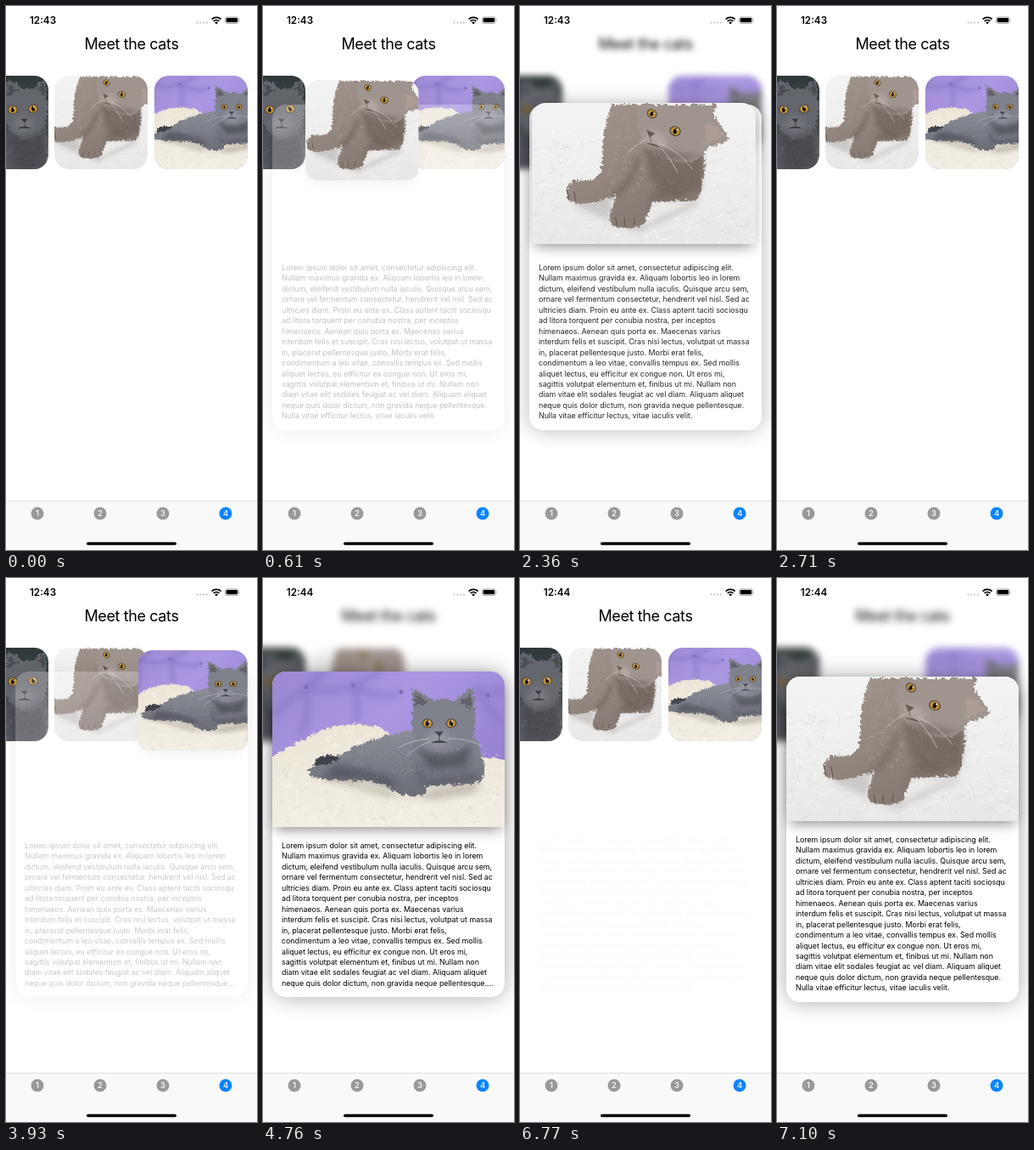
Write an HTML page that moves like this. It is 296 px wide and 640 px high and loops after 8 s.

```html
<!DOCTYPE html>
<html lang="en">
<head>
<meta charset="utf-8">
<title>Meet the cats</title>
<style>
html, body { margin: 0; width: 100%; height: 100%; overflow: hidden; background: #fff; }
body { position: relative; font-family: Inter, "Noto Sans", sans-serif; color: #000; }
body > *, .thumb { position: absolute; }
#grid { inset: 0; }
h1 { position: absolute; left: 0; top: 34px; width: 296px; margin: 0; text-align: center;
  font-size: 18px; line-height: 22px; font-weight: 400; letter-spacing: -.38px; }
.thumb { top: 82px; width: 110px; height: 110px; border-radius: 17px; overflow: hidden; }
#card { left: 11px; width: 274px; height: 383px; border-radius: 16px; background: #fff;
  box-shadow: 0 0 26px #0005; }
#text { position: absolute; left: 11px; margin: 0; white-space: pre; font-size: 8.9px;
  line-height: 12.46px; letter-spacing: -.03px; }
#hero { overflow: hidden; }
#chrome { left: 0; top: 0; }
.fur { fill: none; opacity: .45; }
.shade { filter: blur(4px); }
</style>
</head>
<body>
<svg width="0" height="0">
  <defs>
    <linearGradient id="dusk" x2="0" y2="1">
      <stop stop-color="#2f3838"/><stop offset=".6" stop-color="#4a5150"/><stop offset="1" stop-color="#8c8580"/>
    </linearGradient>
    <linearGradient id="snow" x2="0" y2="1">
      <stop stop-color="#f3f3f3"/><stop offset=".5" stop-color="#efeeee"/><stop offset="1" stop-color="#e9e8e7"/>
    </linearGradient>
    <linearGradient id="sofa" x2="1" y2=".6">
      <stop stop-color="#9c88d2"/><stop offset=".5" stop-color="#ab97e2"/><stop offset="1" stop-color="#9480cf"/>
    </linearGradient>
    <linearGradient id="cream" x2="0" y2="1">
      <stop stop-color="#ece5d6"/><stop offset="1" stop-color="#f3efe6"/>
    </linearGradient>
    <linearGradient id="taupe" x2=".6" y2="1">
      <stop stop-color="#a3978f"/><stop offset="1" stop-color="#857870"/>
    </linearGradient>
    <linearGradient id="slate" x2="0" y2="1">
      <stop stop-color="#8b8d97"/><stop offset="1" stop-color="#6a6c76"/>
    </linearGradient>
    <filter id="fuzz" color-interpolation-filters="sRGB">
      <feTurbulence baseFrequency=".16" numOctaves="2" seed="3"/>
      <feDisplacementMap in="SourceGraphic" scale="8" xChannelSelector="R" yChannelSelector="G"/>
      <feGaussianBlur stdDeviation=".4"/>
    </filter>
    <g id="eye">
      <ellipse rx="6.4" ry="5.4" fill="#4b4540"/><ellipse rx="5.2" ry="4.5" fill="#c08f35"/>
      <ellipse rx="2" ry="3.2" fill="#17130f"/><circle cx="1.4" cy="-2" r=".9" fill="#fff"/>
    </g>
  </defs>

  <symbol id="cat1" viewBox="0 0 110 110" preserveAspectRatio="xMidYMid slice">
    <rect width="110" height="110" fill="url(#dusk)"/>
    <g filter="url(#fuzz)">
      <path d="M42 110C50 90 54 78 62 66L104 58C107 76 106 94 106 110Z" fill="#55575d"/>
      <path d="M55 28L61 2 78 13 92 12 103 0 107 32C109 56 100 72 83 73 64 72 52 52 55 28Z" fill="#64666d"/>
      <path d="M60 22L63 8 73 15ZM96 14L102 5 104 22Z" fill="#4a4c52"/>
      <path class="fur" data-area="58 62 46 48 70 8" stroke="#7d7f87"/>
    </g>
    <path class="shade" d="M62 68Q84 78 104 64V110H70Z" fill="#3a3c42" opacity=".5"/>
    <ellipse cx="81" cy="57" rx="12" ry="9" fill="#777981" class="shade"/>
    <path d="M78 51h7l-3 4ZM82 55v5M74 62Q82 58 89 62" fill="#3b3c41" stroke="#3b3c41" stroke-width=".8"/>
    <use href="#eye" transform="translate(68 40) rotate(12) scale(.95)"/>
    <use href="#eye" transform="translate(92 39) rotate(-10) scale(.95)"/>
  </symbol>

  <symbol id="cat2" viewBox="0 0 274 170" preserveAspectRatio="xMidYMid slice">
    <rect width="274" height="170" fill="url(#snow)"/>
    <path class="fur" data-area="0 40 274 130 130 16" stroke="#d3d1d0"/>
    <path class="fur" data-area="0 30 274 140 200 16" stroke="#fff"/>
    <path class="shade" d="M50 118L100 108 95 146 140 146 206 114 200 124 130 156 60 126Z" fill="#a9a5a2" opacity=".5"/>
    <g filter="url(#fuzz)">
      <path d="M96 0C88 20 86 40 86 56 86 74 84 84 76 90L54 91C39 94 39 114 50 118 70 121 86 114 101 110L95 130C90 142 96 149 110 148 126 150 140 146 139 134L146 117 196 115C206 110 210 84 208 50L222 0Z" fill="url(#taupe)"/>
      <path class="fur" data-area="92 5 95 100 120 9" stroke="#b8ada7"/>
    </g>
    <g class="shade" fill="#5d514c">
      <path d="M136 50C156 70 184 78 208 62L206 104 180 112 146 96Z" opacity=".45"/>
      <path d="M98 108Q122 92 128 62L134 66Q126 98 104 114Z" opacity=".45"/>
      <path d="M139 134Q142 108 160 96L190 114 146 117Z" opacity=".4"/>
    </g>
    <path d="M44 104l3 12M53 106l2 12M103 138l2 10M114 138v10M126 138l-1 9" stroke="#65594f" stroke-width="1.2"/>
    <g filter="url(#fuzz)">
      <path d="M128 0C126 20 128 44 140 52 152 66 180 74 200 66 207 62 210 58 212 52Q232 48 238 39 228 26 220 12L216 0Z" fill="#a0948f"/>
      <path d="M207 23Q225 22 233 38 220 43 208 48 212 36 207 23Z" fill="#ad9c96"/>
    </g>
    <path class="shade" d="M140 52C152 68 186 76 206 62 190 64 164 60 150 48Z" fill="#5f534e" opacity=".6"/>
    <ellipse class="shade" cx="152" cy="44" rx="14" ry="9" transform="rotate(28 152 44)" fill="#b3a8a2"/>
    <path d="M141 33l9 4-6 4ZM145 41l1 6M141 49Q150 48 160 55" fill="#6a5952" stroke="#6a5952" stroke-width=".9"/>
    <path d="M156 48Q180 58 196 80M154 50Q168 64 178 84M140 44Q128 50 118 60" fill="none" stroke="#e6e0dc" stroke-width=".6"/>
    <use href="#eye" transform="translate(147 13) rotate(40)"/>
    <use href="#eye" transform="translate(175 34) rotate(20) scale(1.1)"/>
  </symbol>

  <symbol id="cat3" viewBox="0 0 274 183" preserveAspectRatio="xMidYMid slice">
    <rect width="274" height="183" fill="url(#sofa)"/>
    <path class="shade" d="M0 50Q22 34 40 18T62 0M40 18Q70 28 95 16T128 0M40 18Q44 50 34 75M95 16Q104 40 98 62M95 16Q130 36 152 24M236 20Q256 30 274 20M240 18Q256 50 274 62" fill="none" stroke="#7562b2" stroke-width="5" opacity=".5"/>
    <g fill="#7f6cba"><circle cx="40" cy="18" r="2.5"/><circle cx="95" cy="16" r="2.5"/><circle cx="152" cy="24" r="2.5"/><circle cx="254" cy="28" r="2.5"/></g>
    <g filter="url(#fuzz)">
      <path d="M-8 98C18 92 40 70 70 63 96 57 125 58 145 76L240 98 282 102V192H-8Z" fill="url(#cream)"/>
      <path class="fur" data-area="0 100 274 83 130 12" stroke="#d8cfbd"/>
      <path class="fur" data-area="4 92 270 90 190 12" stroke="#fffdf6"/>
      <path class="fur" data-area="62 64 70 28 50 9" stroke="#fffdf6"/>
    </g>
    <path class="shade" d="M45 120Q100 130 142 142 170 152 186 140L246 132 240 142 190 150 130 146Z" fill="#8f8678" opacity=".5"/>
    <g filter="url(#fuzz)">
      <path d="M166 68C140 70 104 78 80 96 60 98 44 106 42 118 46 127 80 126 110 127 130 130 140 136 148 142 164 147 184 145 178 134 200 130 224 133 242 128 252 118 248 92 236 76Z" fill="url(#slate)"/>
      <path d="M48 104Q54 94 78 97 70 108 50 108Z" fill="#3f4149"/>
      <path class="fur" data-area="95 86 138 36 110 8" stroke="#9b9da7"/>
    </g>
    <g class="shade" fill="#41434c">
      <path d="M166 84Q200 110 236 84L230 112 186 116Z" opacity=".6"/>
      <path d="M72 110Q110 112 146 128L140 136 110 127 60 126Z" opacity=".55"/>
      <path d="M178 134Q168 118 170 100L180 128 240 120 242 128Z" opacity=".5"/>
    </g>
    <g filter="url(#fuzz)">
      <path d="M163 60L164 18Q178 24 187 33 200 29 213 33 223 22 236 17L237 58C238 80 222 92 200 93 178 92 162 80 163 60Z" fill="#7f818b"/>
      <path d="M167 40V24L181 34ZM219 34L233 23 232 42Z" fill="#62606a"/>
    </g>
    <ellipse class="shade" cx="196" cy="79" rx="14" ry="10" fill="#9496a0"/>
    <path d="M192 71h9l-4 5ZM197 76v5M188 84Q197 79 206 84" fill="#44464e" stroke="#44464e"/>
    <path d="M186 79Q165 80 148 90M187 82Q170 88 158 100M207 79Q230 78 248 88" fill="none" stroke="#d5d6dc" stroke-width=".6"/>
    <use href="#eye" transform="translate(183 61) rotate(10)"/>
    <use href="#eye" transform="translate(211 61) rotate(-10)"/>
  </symbol>
</svg>

<div id="grid">
  <h1>Meet the cats</h1>
  <svg class="thumb" style="left:-60px"><use href="#cat1" width="100%" height="100%"/></svg>
  <svg class="thumb" style="left:57px"><use href="#cat2" width="100%" height="100%"/></svg>
  <svg class="thumb" style="left:174.5px"><use href="#cat3" width="100%" height="100%"/></svg>
</div>
<div id="card"><p id="text"></p></div>
<svg id="hero"><use width="100%" height="100%"/></svg>

<svg id="chrome" width="296" height="640" text-anchor="middle">
  <text id="clock" x="43.5" y="21" font-size="11.7" font-weight="600">12:43</text>
  <path d="M225.5 19.6h12" stroke="#bbb" stroke-width="2" stroke-linecap="round" stroke-dasharray="0 3.8"/>
  <g fill="none" stroke="#000" stroke-width="1.8">
    <path d="M242.6 15.6a8 8 0 0 1 11 0M244.7 17.9a5 5 0 0 1 6.8 0"/>
  </g>
  <path d="M246.2 19.4a2.8 2.8 0 0 1 3.8 0l-1.9 2Z"/>
  <rect x="258.4" y="12.9" width="16" height="7.6" rx="2.3" fill="none" stroke="#999" stroke-width=".8"/>
  <rect x="259.6" y="14.1" width="13.6" height="5.2" rx="1.3"/>
  <path d="M275.4 15.4q1.2 1.3 0 2.6Z" fill="#999"/>
  <rect y="583" width="296" height="57" fill="#f9f9f9"/>
  <rect y="582" width="296" height="1" fill="#dedede"/>
  <g id="tabs" font-size="9.5" font-weight="500"></g>
  <rect x="95" y="630.8" width="106" height="3.5" rx="1.75"/>
</svg>

<script>
const $ = id => document.getElementById(id);
const lines = `Lorem ipsum dolor sit amet, consectetur adipiscing elit.
Nullam maximus gravida ex. Aliquam lobortis leo in lorem
dictum, eleifend vestibulum nulla iaculis. Quisque arcu sem,
ornare vel fermentum consectetur, hendrerit vel nisl. Sed ac
ultricies diam. Proin eu ante ex. Class aptent taciti sociosqu
ad litora torquent per conubia nostra, per inceptos
himenaeos. Aenean quis porta ex. Maecenas varius
interdum felis et suscipit. Cras nisi lectus, volutpat ut massa
in, placerat pellentesque justo. Morbi erat felis,
condimentum a leo vitae, convallis tempus ex. Sed mollis
aliquet lectus, eu efficitur ex congue non. Ut eros mi,
sagittis volutpat elementum et, finibus ut mi. Nullam non
diam vitae elit sodales feugiat ac vel diam. Aliquam aliquet
neque quis dolor dictum, non gravida neque pellentesque.`;
const cats = {
  2: { x: 57, top: 116, h: 170, text: lines + '\nNulla vitae efficitur lectus, vitae iaculis velit.' },
  3: { x: 174.5, top: 110, h: 183, text: lines + '…' }
};
// cat, opening start and length, closing start and length (ms)
const visits = [
  [2, 490, 510, 2300, 400],
  [3, 3870, 290, 5560, 400],
  [2, 6765, 330, 8000, 1]
];

let seed = 7;
const rand = () => (seed = seed * 16807 % 2147483647) / 2147483647;
for (const el of document.querySelectorAll('.fur')) {
  const [x, y, w, h, n, len] = el.dataset.area.split(' ').map(Number);
  let d = '';
  for (let i = 0; i < n; i++) {
    const a = rand() * 2.4 + .4, dx = Math.cos(a) * len, dy = Math.sin(a) * len * .6;
    d += `M${x + rand() * w} ${y + rand() * h}q${dx * .2} ${dy * .8} ${dx} ${dy}`;
  }
  el.setAttribute('d', d);
}

$('tabs').innerHTML = [1, 2, 3, 4].map(n => {
  const x = n * 74 - 37;
  return `<circle cx="${x}" cy="597" r="7.5" fill="${n == 4 ? '#0a84ff' : '#999'}"/>
    <text x="${x}" y="600.4" fill="#fff">${n}</text>`;
}).join('');

const clamp = v => Math.max(0, Math.min(1, v));
const mix = (a, b, p) => a + (b - a) * p;
const thumbs = document.querySelectorAll('.thumb');
const heroUse = $('hero').firstChild;
let shown = 0;

function show(id) {
  const cat = cats[shown = id];
  heroUse.setAttribute('href', '#cat' + id);
  $('text').textContent = cat.text;
  $('text').style.top = cat.h + 16 + 'px';
  $('card').style.top = cat.top + 'px';
}

function draw(now) {
  const ms = now % 8000;
  const [id, open, openLen, close, closeLen] = visits.findLast(v => ms >= v[1]) || visits[0];
  const t = Math.min(clamp((ms - open) / openLen), 1 - clamp((ms - close) / closeLen));
  const p = t * t * (3 - 2 * t), cat = cats[id];
  if (shown != id) show(id);

  $('clock').textContent = ms < 4760 ? '12:43' : '12:44';
  $('grid').style.filter = p ? `blur(${4 * p}px)` : 'none';
  thumbs.forEach((el, i) => el.style.visibility = p && i + 1 == id ? 'hidden' : 'visible');
  $('card').style.opacity = t;
  const bottom = mix(17, 0, p), top = mix(17, 16, p);
  Object.assign($('hero').style, {
    visibility: p ? 'visible' : 'hidden',
    left: mix(cat.x, 11, p) + 'px',
    top: mix(82, cat.top, p) + 'px',
    width: mix(110, 274, p) + 'px',
    height: mix(110, cat.h, p) + 'px',
    borderRadius: `${top}px ${top}px ${bottom}px ${bottom}px`,
    boxShadow: `0 6px 16px -4px rgba(0,0,0,${.5 * p})`
  });
}

const start = performance.now();
(function tick() {
  draw(performance.now() - start);
  requestAnimationFrame(tick);
})();
</script>
</body>
</html>
```
